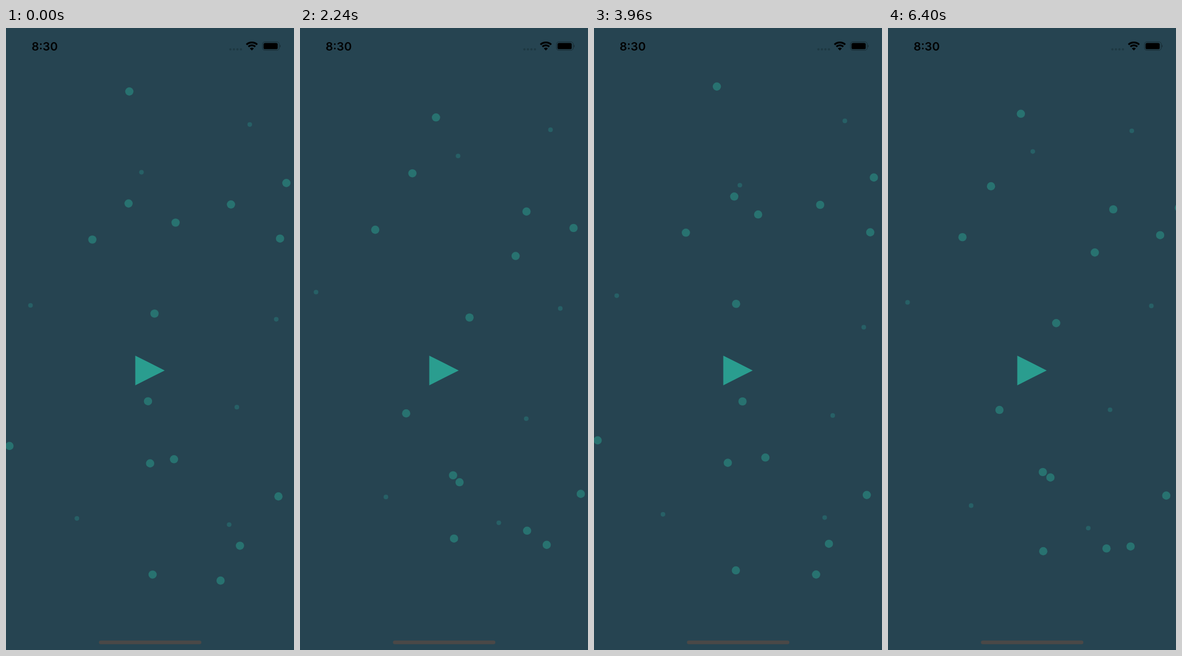
An HTML page for the animation above (6.44 s loop, 509 px wide and 1101 px high).

```html
<!DOCTYPE html>
<html lang="en">
<head>
<meta charset="utf-8">
<title>Drifting dots</title>
<style>
  html, body { margin: 0; height: 100%; overflow: hidden; background: #264451; }
  svg { display: block; width: 509px; height: 1101px; }
  text { font: 600 20.5px Inter, Roboto, sans-serif; }
</style>
</head>
<body>
<svg viewBox="0 0 509 1101">
  <g id="dots"></g>
  <path d="M228.5 580L280.5 606.2L228.5 632.5Z" fill="#2a9d8f"/>
  <text x="45.2" y="40">8:30</text>
  <path d="M396.6 37.8h18.8" stroke="#1e3842" stroke-width="4" stroke-linecap="round" stroke-dasharray="0 6.2"/>
  <g fill="none" stroke="#000" stroke-width="3.1">
    <path d="M425 29.4A13.9 13.9 0 0 1 444 29.4"/>
    <path d="M428.4 33A8.9 8.9 0 0 1 440.6 33"/>
  </g>
  <path d="M434.5 39.8L431 36.2A5 5 0 0 1 438 36.2Z"/>
  <rect x="453.3" y="24.5" width="29.7" height="15" rx="4.3" fill="none" stroke="#182c34"/>
  <rect x="455.2" y="26.5" width="25" height="11" rx="2.6"/>
  <path d="M484 29.5Q486.6 32 484 34.6Z" fill="#182c34"/>
  <rect x="164.3" y="1084.2" width="181" height="6.6" rx="3.3" fill="#4a4847"/>
</svg>
<script>
const LOOP = 6440, CYCLE = 5000, STEP = 40;
const BIG = { r: 7.3, fill: '#287270' }, SMALL = { r: 4.1, fill: '#276066' };

// Dots of one flock share the shape of their oval: skew is its second axis,
// as a complex multiple of the first. Each dot: centre x, y and first axis x, y.
const flocks = [
  { skew: [-1.03, -0.2], dots: [
    [228.4, 131.8, -10, -18], [507, 296, -11, -20], [335.8, 368.6, -34, -22],
    [224, 671, 25, -10], [286, 776, 10, -12]] },
  { skew: [-0.33, -0.33], dots: [
    [137, 848, -11, 20, SMALL], [263, 935, -3, 32], [424.7, 914.7, -11, 2],
    [399.5, 318.5, -2, -6], [488.7, 826.3, -7, 3]] },
  { skew: [-0.21, 0.23], dots: [
    [-8.4, 716.4, 14, 23.5], [393.5, 933, -15, 44.5]] },
  { skew: [0.48, 0.28], dots: [
    [35.3, 475, 8, 17, SMALL], [485, 360.7, -1, 12.6]] },
  { skew: [0.05, 1.2], dots: [
    [263.6, 248, -25, 5, SMALL], [216.8, 281.7, -3, 29], [146, 362.8, 5.5, 12.4]] },
  { skew: [-1.13, 1.2], dots: [
    [262.6, 786.3, -6, -15], [377.6, 874, 15, 6, SMALL]] },
  { skew: [-1.2, -1.7], dots: [
    [277, 504, -13, 3], [469, 510.4, 8.4, 3.7, SMALL]] },
  { skew: [0.7, -1], dots: [
    [440, 173.5, -10, -2, SMALL], [408, 685, -1.3, -14.7, SMALL]] }
];

const group = document.getElementById('dots');
const movers = flocks.flatMap(({ skew, dots }) =>
  dots.map(([x, y, ax, ay, { r, fill } = BIG]) => {
    const circle = document.createElementNS('http://www.w3.org/2000/svg', 'circle');
    circle.setAttribute('r', r);
    circle.setAttribute('fill', fill);
    group.append(circle);
    const bx = ax * skew[0] - ay * skew[1];
    const by = ax * skew[1] + ay * skew[0];
    return (c, s) => {
      circle.setAttribute('cx', x + ax * c + bx * s);
      circle.setAttribute('cy', y + ay * c + by * s);
    };
  }));

// Periodic curve: mean, then cosine and sine weights per harmonic
const wave = (a, mean, ...pairs) => pairs.reduce(
  (sum, [c, s], k) => sum + c * Math.cos((k + 1) * a) + s * Math.sin((k + 1) * a), mean);

function draw(now) {
  let t = Math.floor(now % LOOP / STEP) * STEP;
  if (t > 2080 && t < 2240) t = 2080; // short stall
  const a = t / CYCLE * 2 * Math.PI;
  // A unit circle run at a slightly uneven pace
  const c = wave(a, 0.1, [0.98, 0.03], [-0.11, -0.08], [0.02, 0.08]);
  const s = wave(a, 0.02, [-0.11, 1.03], [0.03, -0.08], [-0.02, 0.06]);
  movers.forEach(move => move(c, s));
}

const start = performance.now();
function tick() {
  draw(performance.now() - start);
  requestAnimationFrame(tick);
}
tick();
</script>
</body>
</html>
```
